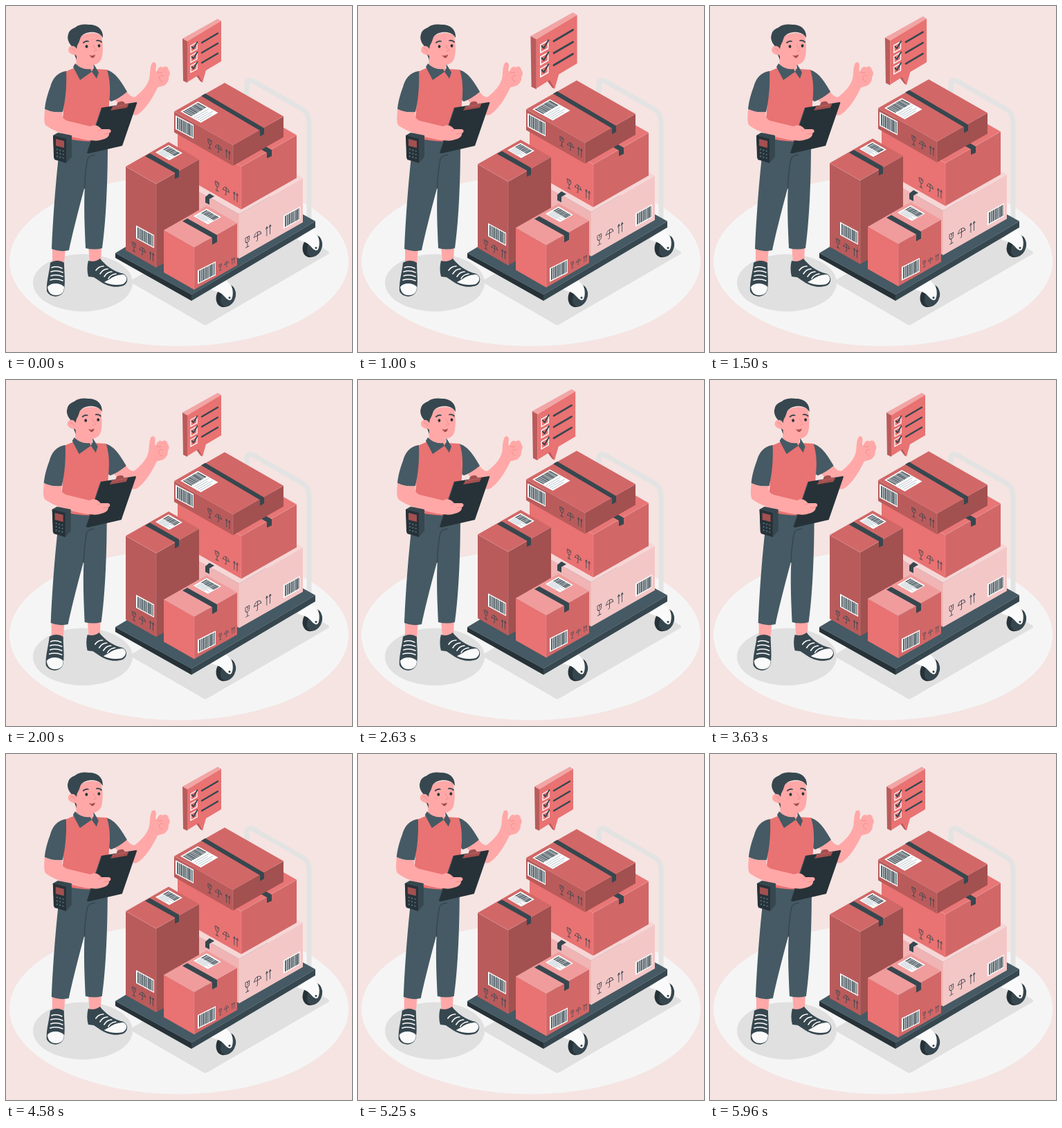
These frames come from a looping animation (500x500 px, 6 s). An HTML page:

```html
<!DOCTYPE html>
<html lang="en">
<head>
<meta charset="utf-8">
<title>Delivery checklist</title>
<style>
html, body { margin: 0; width: 100%; height: 100%; overflow: hidden; background: #f5e4e2; }
svg { display: block; width: 100%; height: 100%; }
.skin { fill: #ffa8a7; }
.slate { fill: #455a64; }
.dark { fill: #37474f; }
.ink { fill: #263238; }
.base { fill: #e97272; }
.line { fill: none; stroke: #37474f; stroke-linecap: round; stroke-linejoin: round; }
.crease { fill: none; stroke: #f28f8f; stroke-width: 1; }
.white { fill: none; stroke: #fff; stroke-linecap: round; }
</style>
</head>
<body>
<svg viewBox="0 0 500 500">
  <rect width="500" height="500" fill="#f5e4e2"/>
  <ellipse cx="250" cy="368.500" rx="245" ry="123" fill="#f5f5f5"/>
  <g fill="#e0e0e0">
    <ellipse cx="111" cy="400" rx="72" ry="41.500"/>
    <path d="M178 398L358 294L465 354Q469 357 465 359L291 460Q288 462 285 460Z"/>
  </g>

  <path d="M348 140V114Q348 104 358 109L428 149Q438 155 438 167V315" fill="none" stroke="#e3e3e3" stroke-width="7"/>
  <g id="wheels"></g>
  <g id="cart">
    <path class="slate" d="M158 357L337 250L447 311L268 417Z"/>
    <path class="ink" d="M158 357L268 417V426L158 364Z"/>
    <path class="dark" d="M268 417L447 311V320L268 426Z"/>
  </g>
  <g id="boxes"></g>

  <g id="man">
    <path class="skin" d="M157 135L174 123C179 130 184 133 187 131C197 123 203 116 206 108C209 102 207 93 210 85C211 80 217 80 217 86C217 90 215 94 218 95C220 88 224 86 227 89C230 86 235 88 235 93C238 95 237 100 235 103C236 108 232 112 230 114C226 117 221 116 219 118C211 135 201 150 190 157C181 161 168 148 157 135Z"/>
    <path class="crease" d="M218 95Q222 98 226 96M221 104Q223 99 228 101M222 104Q222 109 227 109"/>
    <path class="slate" d="M144 92C157 94 167 110 175 124Q163 134 152 138L143 132Z"/>

    <path class="skin" d="M67 349L86 350L84 371L67 369ZM119 347L138 347L137 369L121 371Z"/>
    <path class="slate" d="M79 188C76 220 70 265 66 351Q78 356 91 353C98 320 108 283 114 260C112 290 114 325 115 350Q128 353 139 350C144 315 147 260 147 198Z"/>
    <path d="M129 215Q120 216 118 221C115 235 114 247 113.500 264" fill="none" stroke="#37474f" stroke-width="1.500"/>
    <g id="shoes">
      <path class="dark" d="M64 371C70 367 78 367 84 371C84 384 86 397 84 410C81 423 63 422 59 412C58 398 63 384 64 371Z"/>
      <path d="M60 406C65 399 79 400 84 406C84 414 80 418 72 418C65 418 61 414 60 406Z" fill="#fafafa"/>
      <path class="white" stroke-width="1.600" d="M66 378Q73 375 81 379M65 384Q73 381 82 385M65 390Q73 387 82 391M64 396Q73 393 82 397"/>
      <path class="dark" d="M119 368Q128 371 136 365C143 374 155 384 170 387C177 391 177 400 170 404C158 408 146 405 136 398L127 392L119 391C117 384 117 375 119 368Z"/>
      <path d="M151 394C156 390 164 388 170 388C176 391 176 398 169 402C160 404 150 403 142 399Z" fill="#fafafa"/>
      <path class="white" stroke-width="1.600" d="M130 382Q134 376 141 376M136 387Q140 380 147 380M142 391Q146 384 153 384M148 394Q151 388 159 387"/>
    </g>

    <path class="base" d="M83 96L102 88L128 91L146 92C151 108 151 124 149 140L147 194Q112 199 78 189C84 160 85 130 83 96Z"/>
    <path class="slate" d="M87 94C74 96 67 105 64 117C59 130 57 140 56 149Q69 155 82 153C86 136 88 115 87 94Z"/>
    <path class="skin" d="M101 70L102 90L109 101L124 94L127 82Z"/>
    <path class="slate" d="M100 83L97 88L107 107L124 95L122 91Q110 93 100 83ZM126 84Q128 90 124 95L131 105L134 96L128 86Z"/>

    <g id="head">
      <path class="skin" d="M102 51C108 38 130 36 138 43C140 54 141 65 138 76C134 87 119 87 110 84C104 81 101 75 100 71C92 70 88 65 91 60C94 55 100 57 102 60Z"/>
      <path class="dark" d="M95 58C90 53 88 46 90 41C91 35 96 33 100 31C106 26 114 26 121 27C132 27 141 34 140 46Q136 39 128 38C120 37 112 39 108 45Q106 52 103 57L102 62Q99 57 95 58Z"/>
      <path class="dark" d="M99 70L102 72L102 78Z"/>
      <path class="line" stroke-width="1.800" d="M112 53Q115 50 119 51M131 50Q135 49 138 52"/>
      <ellipse class="ink" cx="116.500" cy="58.500" rx="1.900" ry="2.200"/>
      <ellipse class="ink" cx="134.500" cy="57.500" rx="1.900" ry="2.200"/>
      <path class="crease" d="M126 56Q128 62 131 64Q129 66 126 65M94 62Q99 61 99 66"/>
      <path d="M120 71Q125 73 129 70Q128 76 124 75Z" fill="#a35050"/>
    </g>

    <path class="ink" d="M138 147L188 139Q190 139 189 141L168 202L120 213Q116 213 117 210Z"/>
    <path d="M138 148L117 211" stroke="#455a64" stroke-width="1"/>
    <path d="M151 151L154 146L160 144Q160 138 166 138Q171 137 172 142L177 142L175 147Z" fill="#a35050"/>
    <path d="M154 146L177 142" stroke="#ba5b5b" stroke-width="1.500"/>
    <path class="skin" d="M56 149Q69 155 82 153C80 160 83 164 89 166L122 174C130 170 134 174 138 178L149 178C153 179 152 183 149 184C150 188 145 192 139 193C132 196 125 194 119 194C94 190 68 181 57 172C54 166 56 156 56 149Z"/>
    <path class="crease" d="M138 178Q137 181 133 180M149 184L141 185"/>

    <g id="radio">
      <path class="dark" d="M68 187L75 183L95 187L95 218L87 227L70 222Z"/>
      <path class="ink" d="M68 187L87 192V227L72 222Q69 221 69 218Z"/>
      <path d="M72 192L84 195V205L72 202Z" fill="#a35050"/>
      <path d="M73 207L84 210M73 212L84 215M73 217L84 220" stroke="#546e7a" stroke-width="2" stroke-dasharray="2 2.500"/>
    </g>
  </g>

  <g id="bubble">
    <path d="M255 47L306 18.500L311 21.500L262 51Z" fill="#f2a5a5"/>
    <path d="M255 47L262 51V111L256 108Z" fill="#ba5b5b"/>
    <path d="M275 101L279 99L284 110.500L281 109Z" fill="#ba5b5b"/>
    <path class="base" d="M262 51L311 21.500V80L289 93L284 110.500L278 100L262 110Z"/>
    <g id="rows"></g>
  </g>
</svg>
<script>
const LOOP = 6000;
const $ = id => document.getElementById(id);
const INK = '#37474f';
const path = (d, attrs) => `<path d="${d}" ${attrs}/>`;
const poly = (points, fill) => path('M' + points.map(p => p.join(' ')).join('L') + 'Z', `fill="${fill}"`);
const place = (matrix, body) => `<g transform="matrix(${matrix})">${body}</g>`;

// Faces share one isometric slope; each box is given by its front top corner.
function box(x, y, left, right, height, colors, slope = 0.57) {
  const a = [x, y], l = [x - left, y - left * slope], r = [x + right, y - right * slope];
  const back = [x + right - left, y - (left + right) * slope];
  const down = ([px, py]) => [px, py + height];
  return poly([l, back, r, a], colors[0]) +
    poly([l, a, down(a), down(l)], colors[1]) +
    poly([a, r, down(r), down(a)], colors[2]) +
    path(`M${l}L${a}L${r}M${a}V${y + height}`, `fill="none" stroke="#fff" stroke-opacity=".2" stroke-width=".7"`);
}

function bars(width, top, height) {
  let d = '';
  for (let x = 2, i = 0; x < width - 2; i++) {
    const w = [1.6, .7, 1.1, .6][i * 3 % 4 ^ i % 2];
    d += `M${x} ${top}h${w}v${height}h${-w}z`;
    x += w + (i % 3 ? .7 : 1);
  }
  return path(d, `fill="${INK}"`);
}
const paper = (w, h) => `<rect width="${w}" height="${h}" fill="#fff"/>`;
const barcode = (x, y, w, h, slope) =>
  place([1, slope, 0, 1, x, y], paper(w, h) + bars(w, 1.5, h - 3));

// A shipping label on a top face: code along the back-left (1) or back-right (-1) edge.
function topLabel(x, y, w, h, side) {
  let text = '';
  for (let i = 0; i < 4; i++) text += `M2 ${h * .6 + i * h * .1}h${w - (i % 2 ? 9 : 4)}`;
  return place([.866, -.5 * side, .866 * side, .48, x, y],
    paper(w, h) + bars(w, 2, h * .42) + path(text, 'stroke="#b0bec5" stroke-width=".8"'));
}

const icons = (x, y, scale, slope) => place([scale, scale * slope, 0, scale, x, y],
  path('M0 0H6V4Q6 8 3 8Q0 8 0 4ZM3 8V15M.5 15H5.500M2.500 0L4 3L2.500 5' +
    'M13 7Q14 1 18.500 1Q23 1 24 7Q22 5 20.500 7Q18.500 5 16.500 7Q15 5 13 7ZM18.500 1V13Q18.500 15 16.500 14' +
    'M32.500 15V1M31 4L32.500 1L34 4M37.500 15V1M36 4L37.500 1L39 4', 'class="line" stroke-width=".9"'));

const tape = d => path(d, `fill="${INK}"`);
const LIGHT = ['#f6d6d6', '#f0b4b4', '#f4c7c7'];
const MID = ['#e87676', '#e97272', '#d26767'];
const BRIGHT = ['#f09c9c', '#e97272', '#d26767'];
const DEEP = ['#d26767', '#ba5b5b', '#a35050'];

$('boxes').innerHTML =
  box(337, 301, 90, 92, 64, LIGHT) +
  tape('M288 276L294 271L301 275L294 279V287L288 284Z') +
  icons(346, 335.5, .95, -.57) + barcode(401, 303, 24, 19, -.55) +

  box(340, 232, 92, 80, 62, MID) +
  tape('M363 204L370 200L384 208V217L377 220V212Z') +
  icons(302.5, 253, .84, .55) +

  box(328, 201, 85, 73, 30, DEEP) +
  tape('M282 130L288 126.500L373 176.500V185L367 188.500V180Z') +
  topLabel(252, 152.5, 29, 34, 1) + barcode(245, 158, 26, 20, .53) + icons(292, 192, .82, .56) +

  box(217, 257, 44, 62, 121, DEEP) +
  tape('M201 217L208 213L250 237V247L244 250V241Z') +
  topLabel(235, 201, 23, 22, -1) + barcode(188, 317, 26, 19, .54) + icons(182.5, 341, .8, .52) +

  box(272, 349, 44, 62, 61, BRIGHT) +
  tape('M255 311L262 307L305 331V341L298 345V335Z') +
  topLabel(290, 293, 24, 22, -1) + barcode(277, 382, 26, 20, -.5) + icons(308, 374, .58, -.5);

const wheel = (x, y) => `<g transform="translate(${x} ${y})">` +
  '<ellipse class="ink" cx="0" cy="1" rx="13" ry="17" transform="rotate(28)"/>' +
  '<ellipse class="dark" cx="4" cy="1" rx="10" ry="14.500" transform="rotate(28)"/>' +
  '<path d="M-21 -10L0 -22L8 -13Q11 -5 9 3Q8 8 4 7Q0 5 -3 1Q-8 -5 -21 -8Z" fill="#fafafa"/>' +
  '<circle class="dark" cx="5" cy="3.500" r="1.500"/></g>';
$('wheels').innerHTML = wheel(318, 418) + wheel(443, 346);

$('rows').innerHTML = [0, 14.5, 29].map(dy => `<g transform="translate(0 ${dy})">` +
  '<path d="M267 57.500L276 52.500V62L267 67Z" fill="none" stroke="#fff" stroke-width="1.300"/>' +
  '<path class="line" stroke-width="1.800" d="M268.500 59L271 61.500L276.500 52"/>' +
  '<path class="line" stroke-width="2.400" d="M283 53L306 39.500"/></g>').join('');

// Linear interpolation over [percent, value] stops.
function track(percent, stops) {
  const i = Math.max(1, stops.findIndex(([p]) => p >= percent));
  const [[p0, v0], [p1, v1]] = [stops[i - 1], stops[i]];
  return v0 + (v1 - v0) * (percent - p0) / (p1 - p0);
}
const LIFT = [[0, 0], [50, -10], [100, 0]];
const SHAKE = [0, -1, 2, -4, 4, -4, 4, -4, 2, -1, 0].map((v, i) => [i * 10, v]);
const BEAT = [[0, 1], [10, 1.3], [30, 1], [40, 1], [50, 1.3], [60, 1], [100, 1]];

function draw(time) {
  const percent = time % LOOP / LOOP * 100;
  $('boxes').setAttribute('transform', `translate(0 ${track(percent, LIFT)})`);
  $('man').setAttribute('transform', `translate(${track(percent, SHAKE)} 0)`);
  $('bubble').setAttribute('transform',
    `translate(283 64.500) scale(${track(percent, BEAT)}) translate(-283 -64.500)`);
}

let start;
function tick(now) {
  start ??= now;
  draw(now - start);
  requestAnimationFrame(tick);
}
draw(0);
requestAnimationFrame(tick);
</script>
</body>
</html>
```
